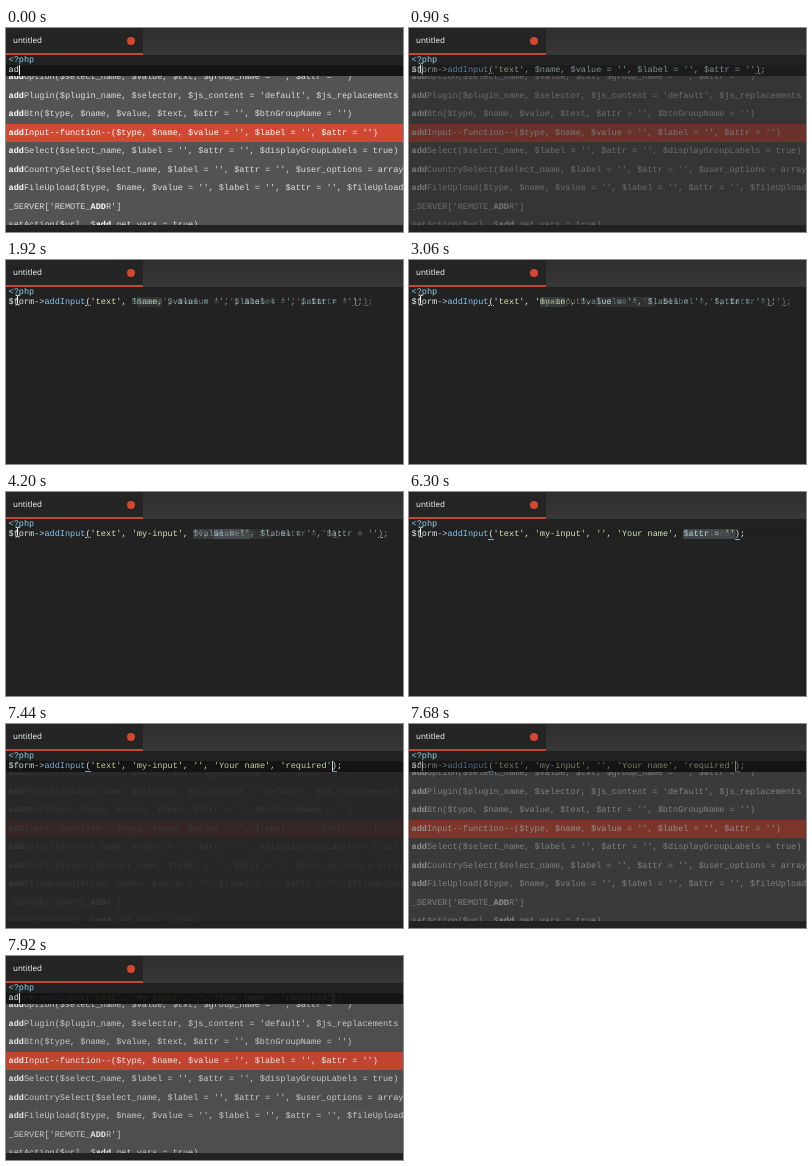
Animation, 397 px wide and 204 px high, one loop 7.98 s. Source, as an HTML page:

```html
<!DOCTYPE html>
<html lang="en">
<head>
<meta charset="utf-8">
<title>Code completion</title>
<style>
html, body { margin: 0; width: 100%; height: 100%; overflow: hidden; background: #222; }
.scene {
  position: absolute; left: 0; top: 0; width: 397px; height: 204px; overflow: hidden;
  background: #222; color: #e6eef0;
  font: 8.55px "Liberation Mono", monospace; text-rendering: geometricPrecision; white-space: pre;
}
.scene div, .scene svg { position: absolute; left: 0; }
.bar { top: 0; width: 397px; height: 27px; background: linear-gradient(#2e2e2e, #383838); }
.tab {
  top: 0; width: 137px; height: 25px; background: #242424; border-bottom: 2px solid #c9452f;
  font: 8px/25px "Open Sans", sans-serif; color: #fff; text-indent: 7px;
}
.dot { margin-left: 121px; top: 9px; width: 8px; height: 8px; border-radius: 50%; background: #d5472f; }
.line { width: 395px; height: 11px; line-height: 11px; padding-left: 2.5px; }
.php { top: 26.5px; color: #8fd6ea; }
.code { top: 37px; }
.active { background: #141414; }
.fn { color: #86c5f0; }
.var, .op { color: #c3e3ea; }
.str { color: #d9e6b4; }
mark { background: #454b4c; color: inherit; }
.pair u { text-decoration: none; box-shadow: 0 1px #6fb3d0; }
.caret { top: 37px; width: 1px; height: 10px; background: #eee; }
.popup { top: 48px; width: 397px; height: 149px; overflow: hidden; background: #535353; color: #dedede; }
.popup div { width: 395px; height: 18.5px; line-height: 18.5px; padding-left: 2.5px; }
.popup b { color: #fff; }
.popup .picked { background: #d34835; color: #fff; }
</style>
</head>
<body>
<script>
const HOLD = 600, STEP = 60, SLOT = 1140;
const CHAR = 8.55 * 0.6;

// « » enclose the selected text
const label = "$label = ''", attr = "$attr = ''";
const args = [
  `$name, $value = '', ${label}, ${attr}`,
  `'«$name»', $value = '', ${label}, ${attr}`,
  `'my-input', «$value = ''», ${label}, ${attr}`,
  `'my-input', '', «${label}», ${attr}`,
  `'my-input', '', 'Your name', «${attr}»`,
  `'my-input', '', 'Your name', 'required'`
];

const options = [
  "addOption($select_name, $value, $txt, $group_name = '', $attr = '')",
  "addPlugin($plugin_name, $selector, $js_content = 'default', $js_replacements = '')",
  "addBtn($type, $name, $value, $text, $attr = '', $btnGroupName = '')",
  "addInput--function--($type, $name, $value = '', $label = '', $attr = '')",
  "addSelect($select_name, $label = '', $attr = '', $displayGroupLabels = true)",
  "addCountrySelect($select_name, $label = '', $attr = '', $user_options = array())",
  "addFileUpload($type, $name, $value = '', $label = '', $attr = '', $fileUpload_config = '')",
  "_SERVER['REMOTE_ADDR']",
  "setAction($url, $add_get_vars = true)"
];

const span = (name, text) => `<span class="${name}">${text}</span>`;
const caret = col => `<div class="caret" style="left:${2.5 + col * CHAR}px"></div>`;

function paint(code) {
  return code.replace(/'[^']*'|\$\w+|addInput|->|=|[()]/g, t =>
    t[0] == "'" ? span("str", t) :
    t == "$form" ? t :
    t[0] == "$" ? span("var", t) :
    t == "addInput" ? span("fn", t) :
    t == "(" || t == ")" ? `<u>${t}</u>` : span("op", t)
  ).replace("«", "<mark>").replace("»", "</mark>");
}

const frame = `<div class="bar"></div><div class="tab">untitled</div><div class="dot"></div>
  <div class="line php">&lt;?php</div>`;
const pointer = `<svg width="20" height="50" style="top:0" fill="none" stroke="#fff" stroke-width="1">
  <path d="M9.5 35q2 0 2 1.5v7q0 1.500-2 1.500M13.500 35q-2 0-2 1.500m0 7q0 1.500 2 1.500"/></svg>`;

const popup = options.map((text, i) =>
  `<div class="${i == 3 ? "picked" : ""}" style="top:${-7.75 + 18.5 * i}px">` +
  text.replace(/add/i, "<b>$&</b>") + "</div>").join("");

const scenes = [
  `<div class="line code active">ad</div>${caret(2)}<div class="popup">${popup}</div>`,
  ...args.map((list, i) => {
    const last = i == args.length - 1;
    const kind = (last ? " active" : "") + (i > 3 ? " pair" : "");
    return `<div class="line code${kind}">${paint(`$form->addInput('text', ${list});`)}</div>` +
      (last ? caret(63) : pointer);
  })
].map(html => {
  const el = document.createElement("div");
  el.className = "scene";
  el.innerHTML = frame + html;
  document.body.append(el);
  return el;
});

function draw(now) {
  const time = now % (SLOT * scenes.length);
  const current = Math.floor(time / SLOT);
  const next = (current + 1) % scenes.length;
  const wait = time % SLOT - HOLD;
  const fade = wait < 0 ? 0 : (Math.floor(wait / STEP) + 1) / 10;
  scenes.forEach((el, i) => {
    el.style.opacity = i == current ? 1 : i == next ? fade : 0;
    el.style.zIndex = i == next ? 2 : i == current ? 1 : 0;
  });
}

function tick() {
  draw(performance.now());
  requestAnimationFrame(tick);
}
tick();
</script>
</body>
</html>
```
